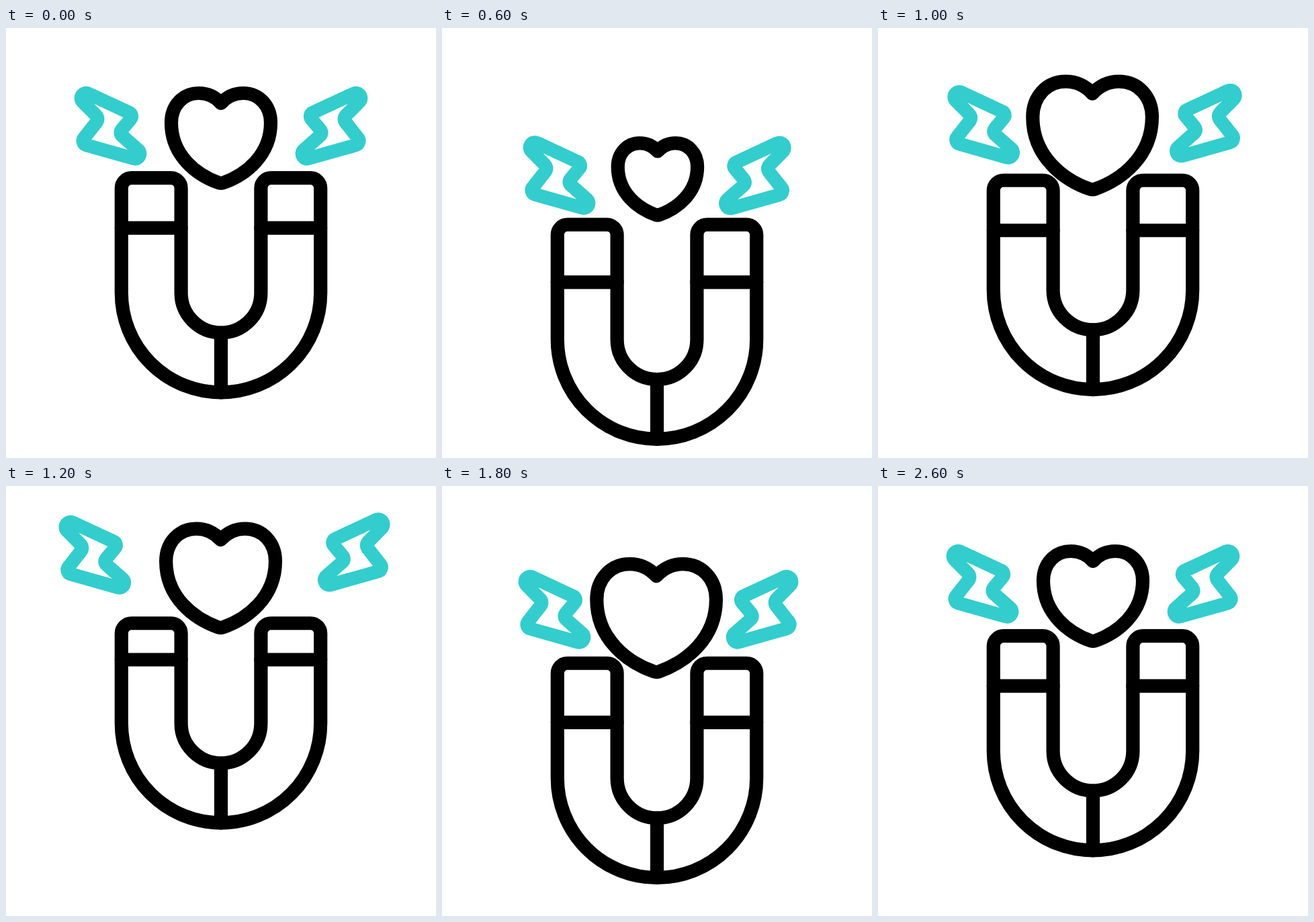
These frames come from a looping animation (640x640 px, 3000 ms). An HTML page:

```html
<!DOCTYPE html>
<html lang="en">
<head>
<meta charset="utf-8">
<title>Heart magnet</title>
<style>
  html, body { margin: 0; width: 100%; height: 100%; overflow: hidden; background: #fff; }
  svg { display: block; width: 100%; height: 100%; }
  path { fill: none; stroke: #000; stroke-width: 20.2; stroke-linecap: round; stroke-linejoin: round; }
  .bolt { stroke: #33cdce; }
</style>
</head>
<body>
<svg viewBox="0 0 640 640">
  <defs>
    <path id="bolt" class="bolt" d="M122.5 97.6L183.4 126A6 6 0 0 1 185.7 135.2L172.5 151Q168.5 156 172.5 160.2
      L197 181.8A7.4 7.4 0 0 1 189.7 194.2L119.3 174.3A6.5 6.5 0 0 1 116 164L134.5 140.5Q138.5 135 134 130L114.2 109.9A7.5 7.5 0 0 1 122.5 97.6Z"/>
  </defs>
  <g id="left"><use href="#bolt"/></g>
  <g id="right"><use href="#bolt" transform="matrix(-1 0 0 1 640 0)"/></g>
  <path id="magnet"/>
  <path id="bands"/>
  <path id="seam"/>
  <path id="heart" d="M0-52C-9-62-20-67-33-67C-57-67-74-48-74-23C-74 26-36 55-3 66.5Q0 67.5 3 66.5
    C36 55 74 26 74-23C74-48 57-67 33-67C20-67 9-62 0-52Z"/>
</svg>
<script>
const LOOP = 3000, STEP = 40;
const START = 200, END = 2600, FIRST = 633, HALF = 600;
const ARM = 88.8, GAP = 118.8, CORNER = 15;
const WIDTH = 2 * ARM + GAP, LEFT = 320 - WIDTH / 2;

const $ = id => document.getElementById(id);
const clamp = p => Math.min(1, Math.max(0, p));
const smooth = p => p * p * (3 - 2 * p);
const ease = (a, b, p) => a + (b - a) * smooth(clamp(p));

// Swings to a, b and c, then back to rest. Lag delays it, rush settles it sooner.
function swing(t, a, b, c, lag = 0, rush = 0) {
  const begin = START + Math.max(0, lag), first = FIRST + lag;
  const turn = (t - first) / HALF;
  if (turn < 0) return ease(0, a, (t - begin) / (first - begin));
  if (turn < 1) return ease(a, b, turn);
  if (turn < 2) return ease(b, c, turn - 1);
  const from = first + 2 * HALF;
  const p = clamp((t - from) / (END - from));
  return ease(c, 0, p + rush * p * p * (1 - p));
}

// Heart size, mirrored in time about the middle of the motion.
function beat(t) {
  const k = Math.abs(t - (START + END) / 2) / 400;
  if (k < 1) return ease(1, 1.2, k);
  return k < 2 ? ease(1.2, .8, k - 1) : ease(.8, 1, k - 2);
}

const squash = t => 23 * smooth(clamp(1 - Math.abs(t - 1250) / 410));
const move = (id, x, y) => $(id).setAttribute("transform", `translate(${x} ${y})`);
const shape = (id, d) => $(id).setAttribute("d", d);

function drawMagnet(top, base, band) {
  const arc = (dx, dy) => `a${CORNER} ${CORNER} 0 0 1 ${dx} ${dy}`;
  const arm = `V${top + CORNER}${arc(CORNER, -CORNER)}h${ARM - 2 * CORNER}${arc(CORNER, CORNER)}V${base}`;
  // The radii are a touch short so that both arcs come out as exact half circles.
  const bend = (w, dir) => `a${w / 2 - .1} ${w / 2 - .1} 0 0 ${dir} ${dir ? -w : w} 0`;
  shape("magnet", `M${LEFT} ${base}${arm}${bend(GAP, 0)}${arm}${bend(WIDTH, 1)}Z`);
  shape("seam", `M320 ${base + GAP / 2}V${base + WIDTH / 2}`);
  shape("bands", `M${LEFT} ${band}h${ARM}m${GAP} 0h${ARM}`);
}

function draw(t) {
  const y = swing(t, 70.6, -42, 41.3, 0, 1);
  drawMagnet(223.2 + y + squash(t), 394.2 + y, 297.7 + swing(t, 83, -41, 55.5, 10, .5));

  move("left", swing(t, 24.5, -30, 18, 100), swing(t, 75.5, -45, 39.3, 10, 1));
  move("right", -swing(t, 24, -41.5, 15, 100), swing(t, 76, -49, 39.3, 10, 1));

  const s = beat(t);
  const hx = 320 - 4.5 * (s - 1), hy = 164 + swing(t, 61, -26.7, 32.5, -33, 1.75);
  $("heart").setAttribute("transform", `translate(${hx} ${hy}) scale(${s})`);
  $("heart").style.strokeWidth = 20.2 / s;
}

const start = performance.now();
function tick() {
  const t = (performance.now() - start) % LOOP;
  draw(Math.floor(t / STEP) * STEP);
  requestAnimationFrame(tick);
}
draw(0);
requestAnimationFrame(tick);
</script>
</body>
</html>
```
